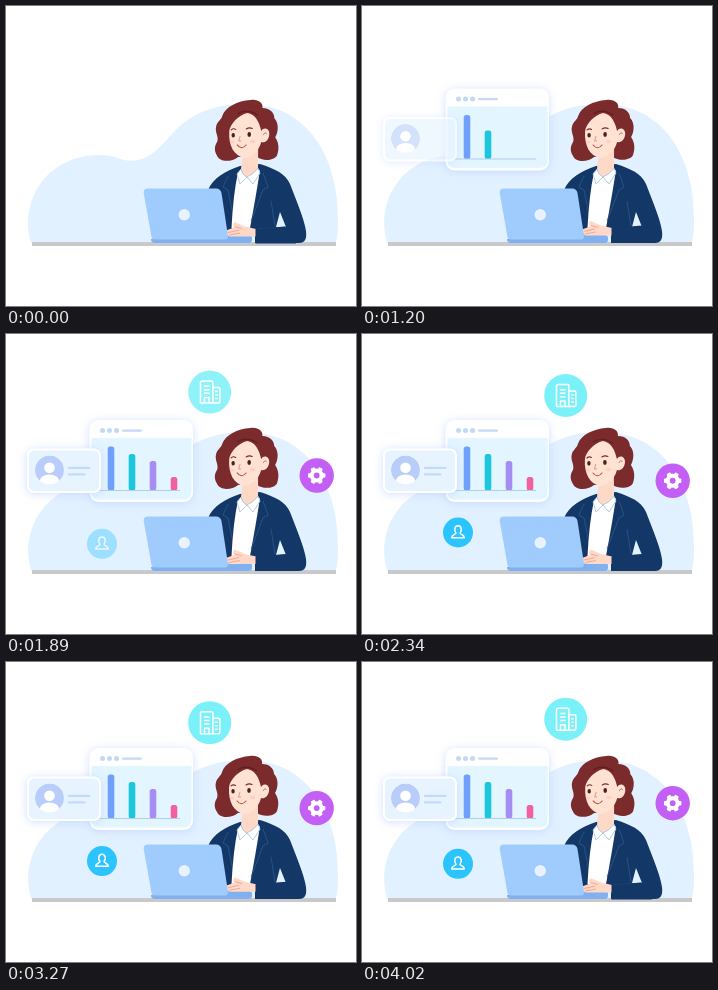
An HTML page for the animation above (4050 ms loop, 350 by 300 pixels).

```html
<!DOCTYPE html>
<html lang="en">
<head>
<meta charset="utf-8">
<title>Office desk</title>
<style>
html, body { margin: 0; width: 100%; height: 100%; overflow: hidden; background: #fff; }
svg { display: block; width: 100%; height: 100%; }
.glow { filter: drop-shadow(0 1px 4px #b4caffa0); }
.icon { fill: none; stroke: #fff; stroke-width: 1.5; stroke-linecap: round; stroke-linejoin: round; }
</style>
</head>
<body>
<svg viewBox="0 0 350 300">
  <defs>
    <clipPath id="face"><circle cx="43.5" cy="136" r="14.5"/></clipPath>
  </defs>

  <path fill="#e2f1ff" d="M25.500 237C13 202 35 149 95 149C111 149 116 157 132 154C165 148 165 98 240 98C302 98 333 152 332 215Q332 228 330 237Z"/>

  <g id="board">
    <g id="chart">
      <rect class="glow" x="83.500" y="86" width="103.500" height="82" rx="9" fill="#fff"/>
      <path fill="#e3f5ff" d="M85.500 104H185.500V158Q185.500 165.500 178 165.500H93Q85.500 165.500 85.500 158Z"/>
      <g fill="#c3d8f7">
        <circle cx="96.500" cy="96.500" r="2.500"/><circle cx="103.500" cy="96.500" r="2.500"/><circle cx="110.500" cy="96.500" r="2.500"/>
        <rect x="116" y="95.500" width="20" height="2.200" rx="1.100"/>
      </g>
      <g id="bars"></g>
      <path stroke="#b0cff0" d="M93 156.500H174"/>
    </g>
    <g id="card">
      <rect class="glow" x="22" y="115.500" width="72" height="42.500" rx="6" fill="#e7f4ff" stroke="#fff" stroke-width="2"/>
      <g clip-path="url(#face)">
        <circle cx="43.500" cy="136" r="14.500" fill="#b8cdfa"/>
        <g fill="#fff"><circle cx="43.500" cy="133.700" r="5.300"/><ellipse cx="43.500" cy="146.500" rx="9.500" ry="6"/></g>
      </g>
      <g fill="#c4dafa">
        <rect class="line" x="62" y="132.800" height="2.300" rx="1.100"/>
        <rect class="line" x="62" y="139.200" height="2.300" rx="1.100"/>
      </g>
    </g>
  </g>

  <g id="tower">
    <circle r="21.500" fill="#7af0f8"/>
    <path class="icon" d="M-9.200 11V-9.500Q-9.200-11-7.700-11H1.700Q3.200-11 3.200-9.500V11ZM3.200-4.500H8.700Q10.200-4.500 10.200-3V9.500Q10.200 11 8.700 11H3.200M-5.200-5.800H-.7M-5.200-2.300H-.7M-5.200 1.200H-.7M-5.200 11V5.500H-.7V11M6-.5H7.500M6 3H7.500M6 6.500H7.500"/>
  </g>
  <g id="gear">
    <circle r="17.200" fill="#c45ff6"/>
    <circle r="4.900" fill="none" stroke="#fff" stroke-width="4"/>
    <g id="teeth" fill="#fff"></g>
  </g>
  <g id="user">
    <circle r="15" fill="#2bc4ff"/>
    <path class="icon" d="M-2 .5C-4.200-2-3.500-6.800 0-6.800S4.200-2 2 .5C2 2 6.300 2 6.300 5.200H-6.300C-6.300 2-2 2-2 .5Z"/>
  </g>

  <path fill="#c9c9c9" d="M26 236H330V240H26Z"/>
  <path fill="#133767" d="M202 184C207 172 219 165 234 160L254 158C269 163 279 167 284 178C290 194 298 212 300 225C301 233 299 237 293 237H249V229H218Z"/>
  <path fill="#e2f1ff" d="M274 206L280 221L270 221Z"/>
  <path fill="#fff" d="M232 166L254 164Q250 190 244 222H225.500Q227 190 232 166Z"/>
  <path fill="none" stroke="#315d91" stroke-width=".7" d="M222 170L217 181L222 184L226 204M257 167L262 181L257 184L245 215M265 195L269 220M279 221L252 223"/>

  <g id="head">
    <path fill="#7b2b2c" d="M244 94C252 93 257 97 256 102C264 102 268 107 268 112C273 117 272 126 269 131C273 137 273 143 271 149C268 155 256 155 251 151L232 151C226 156 214 157 211 150C208 145 208 141 211 136C213 131 208 126 210 120C211 116 215 114 216 110C219 101 231 95 244 94Z"/>
    <path fill="#ffd9c8" d="M237 144L252 138L252 163Q247 172 240 171Q235 168 235 163Z"/>
    <path fill="#ffe2d1" d="M223 125C224 118 232 109 241 107C249 108 253 116 255 125C258 120 264 123 263 129C262 135 258 137 255 136C253 145 245 152 238 152C228 150 222 140 223 125Z"/>
    <path fill="none" stroke="#601d20" stroke-width="1.200" d="M231 108Q240 102 251 109"/>
    <path fill="none" stroke="#b86258" stroke-width=".8" d="M257 129Q259 125 260.500 128"/>
    <path fill="none" stroke="#7b2b2c" stroke-width="1.100" stroke-linecap="round" d="M225 124Q227 122 229.500 123.500M240 123Q243 121 246 122.500"/>
    <g fill="#4c2024"><ellipse cx="227" cy="129.300" rx="1.700" ry="2.300"/><ellipse cx="243" cy="128.500" rx="1.800" ry="2.400"/></g>
    <g fill="#ffd0c2"><ellipse cx="226" cy="136" rx="2.200" ry="1.500"/><ellipse cx="246.500" cy="135.500" rx="2.800" ry="1.700"/></g>
    <path fill="none" stroke="#d88a78" stroke-width=".8" d="M234 130L232.500 135H235"/>
    <path fill="none" stroke="#b8443c" stroke-width="1" stroke-linecap="round" d="M231 139Q235.500 144.500 240 139"/>
  </g>
  <path fill="#fff" stroke="#a3c0df" stroke-width=".8" stroke-linejoin="round" d="M235 163L231 168L234 178L241 171L247 178L254 167L252 162Q247 169 241 171Q236 169 235 163Z"/>

  <path fill="#7fb1f0" d="M216 229H243Q246 229 246 232V234Q246 237 242 237H149Q145 237 145 233Z"/>
  <g id="hand">
    <path fill="#ffd8c8" d="M220 223L228 220C226 217 228 213 231 215.500L239 219L250 221.500V229L224 229Q219 228 220 223Z"/>
    <path fill="none" stroke="#e99f89" stroke-width=".8" d="M222 225L233 222.500M223 227.500L234 225.500M229 219L236 221"/>
    <path fill="#133767" d="M249.500 221.500L280 219L290 236H249.500Z"/>
  </g>
  <path fill="#a0cbfd" d="M142 182.500H210Q214.500 182.500 215.500 187L222 230Q222 233.500 219 233.500H149Q146 233.500 145.500 231L137.700 187Q137.200 182.500 142 182.500Z"/>
  <circle cx="178.300" cy="208.700" r="5.700" fill="#e8f3ff"/>
</svg>

<script>
const LOOP = 4050, BOB = 1080;
const $ = id => document.getElementById(id);
const clamp = u => Math.max(0, Math.min(1, u));
const ramp = (t, a, b) => clamp((t - a) / (b - a));
const ease = (t, a, b) => { const u = ramp(t, a, b); return u * u * (3 - 2 * u); };
const wave = (t, peak, period = BOB) => Math.cos((t - peak) / period * 2 * Math.PI);
const move = (id, x, y) => $(id).setAttribute('transform', `translate(${x} ${y})`);
const add = (parent, attrs) => {
  const el = document.createElementNS('http://www.w3.org/2000/svg', 'rect');
  for (const k in attrs) el.setAttribute(k, attrs[k]);
  return $(parent).appendChild(el);
};

const bars = [[44, '#6fa0fb'], [36.5, '#1cc6dc'], [29.5, '#a58df4'], [13.5, '#f1609f']]
  .map(([h, fill], i) => ({ h, el: add('bars', { x: 101.7 + 21 * i, width: 6.6, rx: 2.5, fill }) }));
for (let i = 0; i < 6; i++)
  add('teeth', { x: -2.2, y: -8.7, width: 4.4, height: 4, rx: 1, transform: `rotate(${i * 60 + 30})` });
const lines = [...document.querySelectorAll('.line')];

// x, mid height, bob size, time of highest point, entry start and end, entry drop
const badges = {
  tower: [203.7, 59.3, 2.2, 1800, 1560, 1960, 9],
  gear: [310.7, 143.8, 3, 1770, 1350, 1680, 8],
  user: [96, 200.2, 1.7, 2340, 1710, 2190, 12]
};

function draw(t) {
  move('board', 0, 16.5 - 20 * ease(t, 570, 1050) + 3.5 * ease(t, 1200, 1560));
  $('chart').style.opacity = ramp(t, 570, 820);
  $('card').style.opacity = ramp(t, 1040, 1310);

  bars.forEach(({ h, el }, i) => {
    const start = 700 + 250 * i;
    const size = h * ease(t, start, start + 360);
    el.setAttribute('y', 156.5 - size);
    el.setAttribute('height', size);
  });
  lines.forEach((el, i) => el.setAttribute('width', (i ? 17.5 : 22.5) * ramp(t, 1560, 1860)));

  for (const id in badges) {
    const [x, y, size, peak, start, end, drop] = badges[id];
    move(id, x, y - size * wave(t, peak) + drop * (1 - ease(t, start, end)));
    $(id).style.opacity = ramp(t, start, end);
  }

  move('hand', 0, 0.8 + 0.8 * wave(t, 0, LOOP / 9));
  $('head').setAttribute('transform', `rotate(${0.4 * wave(t, 0, LOOP / 4)} 244 163)`);
}

function tick() {
  draw(performance.now() % LOOP);
  requestAnimationFrame(tick);
}
tick();
</script>
</body>
</html>
```
